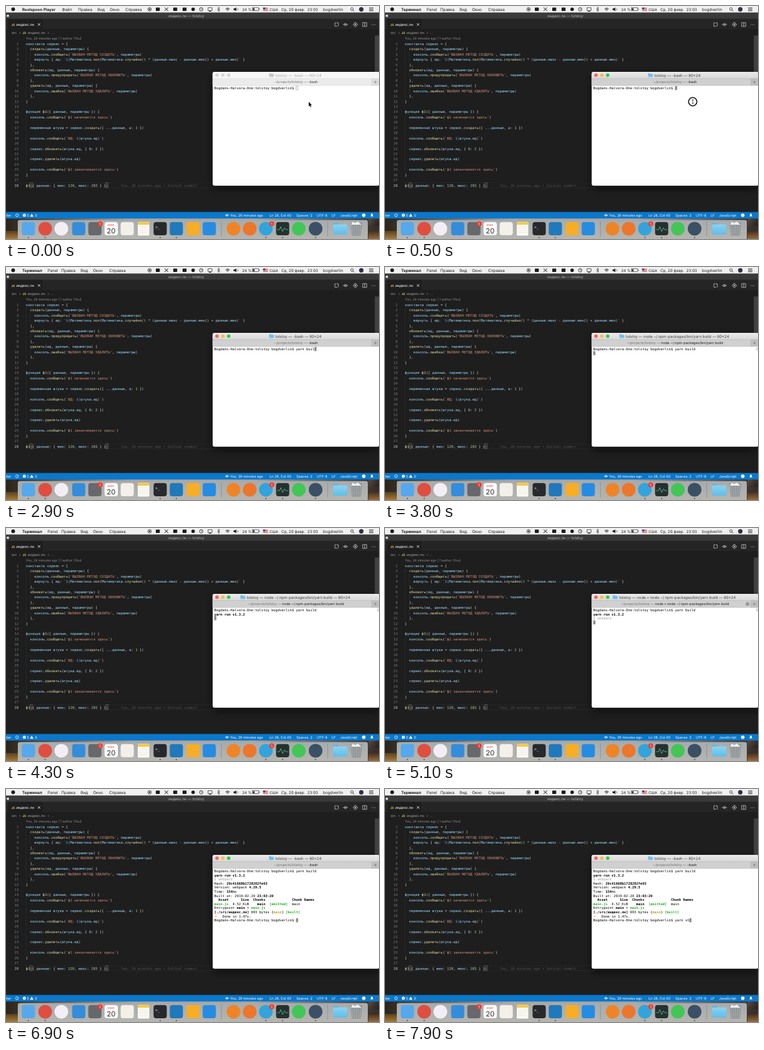
These frames come from a looping animation (600 px wide and 375 px high, 8 s). An HTML page with a canvas:

```html
<!DOCTYPE html>
<html lang="ru">
<head>
<meta charset="utf-8">
<style>
html, body { margin: 0; width: 100%; height: 100%; overflow: hidden; background: #1e1e1e; }
canvas { display: block; }
</style>
</head>
<body>
<canvas id="stage" width="600" height="375"></canvas>
<script>
const ctx = document.getElementById('stage').getContext('2d');
const LOOP = 8000;
const UI = 'Inter, "Open Sans", sans-serif', MONO = '"DejaVu Sans Mono", monospace';
const CODE_SIZE = 5.63, CODE_COL = 3.388, TERM_SIZE = 5.46, TERM_COL = 3.287, TERM_ROW = 6.6;
const ACTIVE = 400, ENTER = 3600, RUN = 4300, WEBPACK = 4500, CHILD = 4700, OUTPUT = 5500, DONE = 5800;
const USER = 'bogdverlin', PROMPT = `Bogdans-Halvora-One:tolstoy ${USER}$ `;

const CODE = `константа сервис = {
  создать(данные, параметры) {
    консоль.сообщить('ВЫЗВАН МЕТОД СОЗДАТЬ', параметры)
    вернуть { ид: \`\${Математика.пол(Математика.случайно() * (данные.макс - данные.мин)) + данные.мин}\` }
  },
  обновить(ид, данные, параметры) {
    консоль.предупредить('ВЫЗВАН МЕТОД ОБНОВИТЬ', параметры)
  },
  удалить(ид, данные, параметры) {
    консоль.ошибка('ВЫЗВАН МЕТОД УДАЛИТЬ', параметры)
  },
}

функция ф1({ данные, параметры }) {
  консоль.сообщить('ф1 начинается здесь')

  переменная штука = сервис.создать({ ...данные, а: 1 })

  консоль.сообщить(\`ИД: \${штука.ид}\`)

  сервис.обновить(штука.ид, { б: 2 })

  сервис.удалить(штука.ид)

  консоль.сообщить('ф1 заканчивается здесь')
}

ф1({ данные: { мин: 120, макс: 283 } })`.split('\n');

// Segments start with a style letter: n plain, b bold, d dim, g green, y yellow.
const REPORT = [
  'nHash: |b29c41668b1728282fe93',
  'nVersion: webpack |b4.29.5',
  'nTime: |b154|nms',
  'nBuilt at: 2019-02-20 |b23:03:20',
  'b  Asset      Size  Chunks             Chunk Names',
  'gmain.js|n  4.52 KiB    |bmain|n  |g[emitted]|n  main',
  'nEntrypoint |bmain|n = |gmain.js',
  'b[./src/индекс.лн]|n 693 bytes {|ymain|n} |g[built]',
  'n    Done in 1.47s.'
];
const INK = { n: '#000', b: '#000', d: '#a0a0a0', g: '#22b022', y: '#b5a614' };

function text(s, x, y, size, color, { font = UI, style = '', align = 'left' } = {}) {
  ctx.save();
  ctx.translate(x, y);
  ctx.scale(.1, .1);
  ctx.font = `${style} ${size * 10}px ${font}`;
  ctx.textAlign = align;
  ctx.fillStyle = color;
  ctx.fillText(s, 0, 0);
  const width = ctx.measureText(s).width / 10;
  ctx.restore();
  return width;
}
function box(x, y, w, h, color, r = 0) {
  ctx.fillStyle = color;
  ctx.beginPath();
  ctx.roundRect(x, y, w, h, r);
  ctx.fill();
}
function dot(x, y, r, color) {
  ctx.fillStyle = color;
  ctx.beginPath();
  ctx.arc(x, y, r, 0, 7);
  ctx.fill();
}
function ring(x, y, r, color, width = .8) {
  ctx.strokeStyle = color;
  ctx.lineWidth = width;
  ctx.beginPath();
  ctx.arc(x, y, r, 0, 7);
  ctx.stroke();
}
function frame(x, y, w, h, color, width = .6) {
  ctx.strokeStyle = color;
  ctx.lineWidth = width;
  ctx.strokeRect(x, y, w, h);
}
function line(points, color, width = .8) {
  ctx.strokeStyle = color;
  ctx.lineWidth = width;
  ctx.beginPath();
  for (let i = 0; i < points.length; i += 2) ctx.lineTo(points[i], points[i + 1]);
  ctx.stroke();
}
function shape(points, color) {
  line(points, color, .1);
  ctx.fillStyle = color;
  ctx.fill();
}
function gradient(x0, y0, x1, y1, ...colors) {
  const g = ctx.createLinearGradient(x0, y0, x1, y1);
  colors.forEach((c, i) => g.addColorStop(i / (colors.length - 1), c));
  return g;
}

function menuBar(active) {
  const ink = '#1c1c1c';
  box(0, 0, 600, 10.4, '#f0f0f0');
  dot(11.5, 5.2, 3, ink);
  const items = active
    ? [['Терминал', 26], ['Panel', 67], ['Правка', 89], ['Вид', 120], ['Окно', 140], ['Справка', 166]]
    : [['Reelspoon Player', 26], ['Файл', 90], ['Правка', 116], ['Вид', 147], ['Окно', 167], ['Справка', 192]];
  items.forEach(([s, x], i) => text(s, x, 7.6, 6.35, ink, { style: i ? '' : 'bold' }));

  ring(231, 5.3, 2.8, ink); dot(231, 5.3, 1.2, ink);
  for (const x of [244, 272, 287]) box(x - 3, 2.6, 6.4, 5.4, ink, 1);
  line([255, 2.5, 261, 8], ink, 1); line([261, 2.5, 255, 8], ink, 1);
  dot(301, 5.2, 2.8, ink);
  ring(314, 5.3, 2.8, ink); line([314, 3.5, 314, 5.5, 315.5, 5.5], ink, .6);
  frame(325, 2.8, 6.5, 4.4, ink, .7); line([326.5, 8.5, 330, 8.5], ink, 1);
  line([340, 3.6, 344, 7, 342, 8.8, 342, 1.6, 344, 3.6, 340, 7], ink, .6);
  for (const r of [1.2, 3, 4.8]) {
    ctx.strokeStyle = ink; ctx.lineWidth = 1;
    ctx.beginPath(); ctx.arc(356.5, 8.2, r, -2.3, -.84); ctx.stroke();
  }
  shape([366, 4, 368, 4, 370.5, 2.4, 370.5, 8.2, 368, 6.6, 366, 6.6], ink);
  line([372.5, 3.6, 373.2, 5.3, 372.5, 7], ink, .6);
  text('24 %', 380, 7.6, 6.1, ink);
  frame(396.5, 2.8, 10, 4.8, ink, .6); box(397.3, 3.6, 2.4, 3.2, ink); box(407.3, 4.3, .8, 1.8, ink);
  box(413.5, 2.6, 8, 5.4, '#f4f0f0');
  for (let i = 0; i < 4; i++) box(413.5, 2.6 + i * 1.5, 8, .8, '#cc4350');
  box(413.5, 2.6, 3.6, 2.9, '#39487e');
  text('США', 424, 7.6, 5.8, ink);
  text('Ср, 20 февр.  23:03', 443, 7.6, 6.2, ink);
  text(USER, 510, 7.6, 6.4, ink);
  ring(556.5, 4.8, 2.1, ink); line([558, 6.4, 560, 8.4], ink, 1);
  dot(571.5, 5.3, 3.6, '#343048');
  for (const y of [3, 5.3, 7.6]) line([584, y, 591, y], ink, .9);
}

function codeLine(s, x, y) {
  const token = /'[^']*'|`[^$`]*|\}`|\$\{|\d+|[а-яё][а-яё\d]*(\()?|\s+|./gi;
  for (const m of s.matchAll(token)) {
    let part = m[0], color = '#d4d4d4';
    if (/^['`]|\}`$/.test(part)) color = '#ce9178';
    else if (part === '${') color = '#569cd6';
    else if (/^\d/.test(part)) color = '#b5cea8';
    else if (/^[а-яё]/i.test(part)) color = m[1] ? '#dcdcaa' : '#9cdcfe';
    const at = x + m.index * CODE_COL;
    if (m[1]) {
      part = part.slice(0, -1);
      text('(', at + part.length * CODE_COL, y, CODE_SIZE, '#d4d4d4', { font: MONO });
    }
    text(part, at, y, CODE_SIZE, color, { font: MONO });
  }
}

function editor() {
  box(0, 10.4, 600, 331.6, '#1e1e1e');
  box(0, 10.4, 600, 10.4, '#3a3a3a', [3, 3, 0, 0]);
  dot(3, 15.8, 2, '#ddd');
  text('индекс.лн — tolstoy', 290, 18, 6, '#b5b5b5', { align: 'center' });
  box(0, 20.8, 600, 16.3, '#252526');
  box(4, 20.8, 55, 16.3, '#1e1e1e');
  text('JS', 8.5, 31.6, 4.8, '#d8c54a', { style: 'bold' });
  text('индекс.лн', 16.5, 31.8, 5.9, '#fff', { style: 'italic' });
  line([51.3, 27.8, 55.1, 31.6], '#eee', .9); line([55.1, 27.8, 51.3, 31.6], '#eee', .9);

  const icon = '#c5c5c5';
  line([531, 27, 529, 27, 529, 32.5, 533, 32.5], icon); line([531.5, 27, 534.5, 27, 534.5, 32.5], icon);
  line([542, 29.8, 550, 29.8], icon); ring(546, 29.8, 1.8, icon);
  line([562, 26, 565.5, 29.8, 562, 33.4, 558.5, 29.8, 562, 26], icon, 1); dot(562, 29.8, 1.2, icon);
  frame(573.8, 26.8, 6.4, 6, icon, .8); line([577, 26.8, 577, 32.8], icon);
  for (const x of [589, 591.5, 594]) dot(x, 30, .6, icon);

  const crumb = '#a0a0a0';
  text('src', 9, 45, 5.7, crumb); text('›', 21.5, 45, 5.8, crumb);
  text('JS', 26.5, 44.8, 4.8, '#d8c54a', { style: 'bold' });
  text('индекс.лн', 35, 45, 5.7, crumb); text('›', 67, 45, 5.8, crumb); text('…', 72, 45, 5.8, crumb);
  text('You, 24 minutes ago | 1 author (You)', 32, 54, 5.25, '#929292');

  box(593.3, 47.5, 6.7, 110, '#424242');
  frame(32, 284.3, 561, 8.4, '#2b2b2b', .7);
  for (const [x, from, to] of [[32.2, 65, 149], [39, 74, 90], [39, 107, 115.5], [39, 132, 141], [32.2, 174, 267]])
    line([x, from, x, to], '#404040', .4);
  CODE.forEach((s, i) => {
    const y = 62.9 + i * 8.43;
    text(i + 1, 20.3, y, CODE_SIZE, i === 27 ? '#c6c6c6' : '#7a7a7a', { font: MONO, align: 'right' });
    codeLine(s, 32, y);
  });
  for (const col of [2, 38]) frame(32 + col * CODE_COL, 284.6, 3.5, 7.6, '#888', .5);
  text('You, 26 minutes ago • Initial commit', 185, 290.5, CODE_SIZE, '#535353', { font: MONO });

  const blue = '#0a78cb';
  box(0, 331.4, 600, 10.8, blue);
  text('master', 8.3, 338.8, 5.5, '#fff', { align: 'right' });
  ring(17.8, 336.8, 2.2, '#fff', .8);
  dot(29.5, 336.8, 2.5, '#fff');
  line([28.5, 335.8, 30.5, 337.8], blue, .6); line([30.5, 335.8, 28.5, 337.8], blue, .6);
  text('0', 33.5, 338.8, 5.5, '#fff');
  shape([41.3, 334.2, 44, 339, 38.6, 339], '#fff');
  text('0', 46.5, 338.8, 5.5, '#fff');
  line([352.5, 336.8, 358.5, 336.8], '#fff'); ring(355.5, 336.8, 1.5, '#fff');
  for (const [s, x] of [['You, 26 minutes ago', 360.5], ['Ln 28, Col 40', 424], ['Spaces: 2', 467],
    ['UTF-8', 500], ['LF', 524], ['JavaScript', 537.5]]) text(s, x, 338.8, 5.5, '#fff');
  dot(575.5, 336.8, 2.8, '#fff');
  line([574.3, 337.3, 575.5, 338.2, 576.7, 337.3], blue, .5);
  shape([586, 338.4, 587, 337, 587.5, 334.2, 589.5, 334.2, 590, 337, 591, 338.4], '#fff');
}

function badge(x) {
  dot(x, 350.6, 4, '#f33b32');
  text('1', x, 352.7, 5.8, '#fff', { align: 'center' });
}

function dock() {
  box(0, 342, 600, 33, gradient(0, 0, 600, 0, '#2b241b', '#a8a297', '#aaa499', '#352c27'));
  box(0, 362, 20, 13, gradient(0, 362, 0, 375, '#574220', '#a87a35'));
  box(583, 342, 17, 12, gradient(583, 342, 600, 354, '#594b40', '#231f20'));
  box(583, 361, 17, 14, gradient(0, 361, 0, 375, '#3a2b22', '#9a6b3a'));
  box(19, 344.5, 563, 34, gradient(0, 344, 0, 375, '#a6abae', '#b6b5b0'), 3);

  const squares = [[36, '#55a8ec'], [117, '#348dda'], [143, '#66686b'], [195, '#f3f0e9'],
    [248, '#27292c'], [274, '#2079bb'], [301, '#f7ad25'], [327, '#258ce2'], [445, '#25312f']];
  for (const [x, c] of squares) box(x - 10.6, 347.8, 21.2, 21.2, c, 4);
  const circles = [[63, '#df4e40'], [89, '#f3eef5'], [366, '#ef8427'], [392, '#ec762b'],
    [418, '#32a4db'], [471, '#42c656'], [498, '#3b5064']];
  for (const [x, c] of circles) dot(x, 358.4, 11, c);
  badge(151.5); badge(427.5);

  box(158.5, 347.8, 21.5, 21.2, '#fafafa', 4);
  text('ФЕВР.', 169.2, 353.6, 4, '#e34942', { align: 'center' });
  text('20', 169.2, 365.6, 11.5, '#333', { align: 'center' });
  box(212, 347.6, 18.5, 22, '#fbfaf3', 1.5);
  box(212, 347.6, 18.5, 4.5, '#f2ca4b', [1.5, 1.5, 0, 0]);
  for (let y = 355.6; y < 367; y += 3) line([214, y, 228.5, y], '#ddd', .5);
  text('>_', 240.3, 357.6, 6, '#fff', { font: MONO });
  line([436, 360, 440, 360, 442, 355, 445, 363, 448, 357, 450, 360, 454, 360], '#54c991', .8);
  for (const x of [346.5, 517.5]) line([x, 347, x, 371], '#838a8e', .7);
  box(526, 349.6, 9, 4, '#59b5df', 1);
  box(526, 351.6, 23, 16.5, gradient(0, 351, 0, 368, '#8bd3f3', '#61bde6'), 1.5);
  shape([554, 348.5, 573, 348.5, 570.5, 369.5, 556.5, 369.5], '#8e9395');
  shape([555, 352, 557, 347.5, 562, 349, 566, 347, 572, 352], '#eee');
  for (let i = 0; i < 5; i++) line([556 + i * 3.7, 351, 558 + i * 2.7, 368.5], '#c8cdd0', .5);
  for (const x of [36, 63, 248, 274, 418, 445, 498]) dot(x, 372.6, .9, '#333');
}

function termLine(s, row) {
  let col = 0;
  for (const part of s.split('|')) {
    const style = part[0], body = part.slice(1);
    text(body, 335 + col * TERM_COL, 134 + row * TERM_ROW, TERM_SIZE, INK[style],
      { font: MONO, style: 'bgy'.includes(style) ? 'bold' : '' });
    col += body.length;
  }
  return col;
}

function terminal(t, active) {
  const edge = active ? '#b0b0b0' : '#cfcfcf';
  ctx.save();
  ctx.shadowColor = 'rgba(0,0,0,.6)';
  ctx.shadowBlur = 14;
  ctx.shadowOffsetY = 5;
  box(332.5, 106, 268, 183.2, '#fff', 3);
  ctx.restore();
  box(332.5, 106, 268, 11, active ? gradient(0, 106, 0, 117, '#ebebeb', '#d7d7d7') : '#f6f6f6', [3, 3, 0, 0]);
  box(332.5, 116.8, 268, 11.2, active ? '#d0d0d0' : '#ebebeb');
  box(588.3, 116.8, 11.7, 11.2, active ? '#bfbfbf' : '#dcdcdc');
  line([332.5, 116.8, 600, 116.8], edge, .5);
  line([332.5, 128, 600, 128], edge, .5);
  line([588.3, 117, 588.3, 128], edge, .5);
  const lights = active ? ['#fc605b', '#fdbc40', '#34c84a'] : Array(3).fill('#d6d6d6');
  lights.forEach((c, i) => dot(339.4 + i * 9.4, 111.3, 2.8, c));

  let process = '-bash';
  if (t >= ENTER && t < DONE) process = (t >= CHILD ? 'node • ' : '') + 'node ~/.npm-packages/bin/yarn build';
  const title = `tolstoy — ${process} — 80×24`;
  const width = text(title, 470.3, 113.6, 6.08, active ? '#3c3c3c' : '#a4a4a4', { align: 'center' });
  const left = 470.3 - width / 2 - 10;
  box(left, 108.5, 3.5, 2, active ? '#55ade0' : '#bcbcbc', .5);
  box(left, 109.2, 7.6, 5, active ? '#6cc0ee' : '#c6c6c6', .7);

  const path = '~/projects/tolstoy — ', tabSize = 5.55;
  ctx.font = `${tabSize * 10}px ${UI}`;
  const [pathWidth, processWidth] = [path, process].map(s => ctx.measureText(s).width / 10);
  const start = 466.5 - (pathWidth + processWidth) / 2;
  text(path, start, 124.3, tabSize, '#727272');
  text(process, start + pathWidth, 124.3, tabSize, active ? '#1a1a1a' : '#333');
  line([592, 122.3, 596.4, 122.3], '#666', .6); line([594.2, 120.1, 594.2, 124.5], '#666', .6);
  if (t >= CHILD && t < DONE) dot(583.2, 122.3, 3, '#999');

  const typed = (s, times) => s.slice(0, times.filter(at => t >= at).length);
  let row = 0, col = termLine('n' + PROMPT
    + typed('yarn build', [1300, 1400, 1500, 1700, 1800, 2200, 2400, 2600, 2900, 3100]), 0);
  if (t >= ENTER) { row = 1; col = 0; }
  if (t >= RUN) termLine('byarn run v1.3.2', row++);
  if (t >= WEBPACK) termLine('d$ webpack', row++);
  if (t >= OUTPUT) {
    const ready = t >= DONE ? REPORT : REPORT.slice(0, -1);
    ready.forEach(s => termLine(s, row++));
  }
  if (t >= DONE) {
    text('✦', 335, 206.6, 6, '#e9bd48', { font: '"DejaVu Sans", sans-serif' });
    col = termLine('n' + PROMPT + typed('yarn st', [7100, 7200, 7300, 7400, 7700, 7800, 7900]), row);
  }
  const x = 335 + col * TERM_COL, y = 128.8 + row * TERM_ROW;
  if (active) box(x, y, 3.4, 6.5, '#8c8c8c');
  else frame(x + .2, y + .3, 3, 5.9, '#8c8c8c', .6);
  if (t >= ENTER && t < 6900) box(597.8, 129.5, 1.4, 5, '#b5b5b5', .7);
}

function pointer(t) {
  if (t >= 1300) return;
  const k = Math.min(1, t / ACTIVE), ease = k * k * (3 - 2 * k);
  const x = 487 + 8 * ease, y = 154.5 - .5 * ease;
  if (t < ACTIVE) {
    const arrow = [0, 0, 0, 7, 1.6, 5.6, 2.7, 8.2, 3.9, 7.7, 2.8, 5.1, 5, 5, 0, 0].map((v, i) => v + (i % 2 ? y : x));
    line(arrow, '#fff', 1.2);
    shape(arrow, '#000');
    return;
  }
  if (t < 700) { dot(x, y, 7, '#fff'); ring(x, y, 6.7, '#111', 1.6); }
  line([x, y - 3, x, y + 3], '#222', .8);
  for (const d of [-3.2, 3.2]) line([x - 1.5, y + d, x + 1.5, y + d], '#222', .7);
}

function draw(now) {
  const t = now % LOOP, active = t >= ACTIVE;
  ctx.clearRect(0, 0, 600, 375);
  ctx.textRendering = 'geometricPrecision';
  editor();
  dock();
  menuBar(active);
  terminal(t, active);
  pointer(t);
  requestAnimationFrame(draw);
}
requestAnimationFrame(draw);
</script>
</body>
</html>
```
